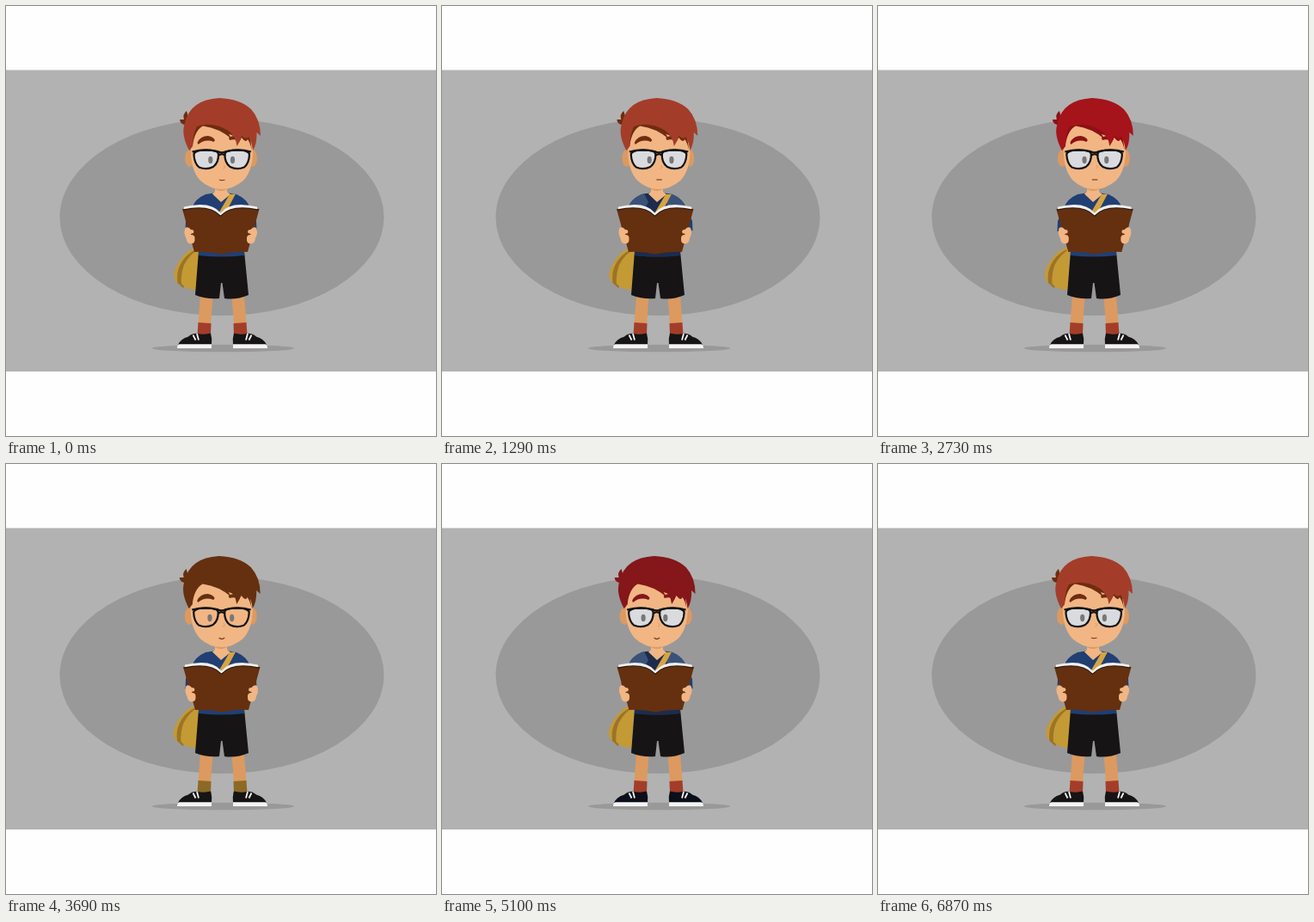
Animation, 500 px wide and 500 px high, one loop 6.9 s. Source, as an HTML page:

```html
<!DOCTYPE html>
<html lang="en">
<head>
<meta charset="utf-8">
<title>Boy reading</title>
<style>
html, body { margin: 0; width: 100%; height: 100%; overflow: hidden; background: #fefefe; }
svg { display: block; width: 100%; height: 100%; }
.skin { fill: #f1b684; }
.shade { fill: #dc9a60; }
.shirt { fill: #213f73; }
.dark { fill: #161414; }
.hair { fill: var(--hair); }
.under { fill: var(--under); }
.sock { fill: var(--sock); }
.shoe { fill: var(--shoe); }
.frame { fill: var(--lens); stroke: #121212; stroke-width: 2.2; }
</style>
</head>
<body>
<svg id="stage" viewBox="0 0 500 500">
  <defs>
    <g id="foot">
      <path class="shade" d="M226 336 L240.500 338 L238 370 H223.500 Z"/>
      <path class="sock" d="M223.500 368 L238.500 369 L238 383 H222.500 Z"/>
      <path class="shoe" d="M200 394 Q203 387 212 384.500 Q217 380 223 381 Q231 382.500 238 380.500 Q240 387 239 394 Z"/>
      <path d="M199 398 Q199 393.500 202 393.300 H239 V398 Z" fill="#f4f4f4"/>
      <path d="M217.500 382.500 L220.500 388.500 M222 381 L224 388.500" stroke="#f4f4f4" stroke-width="1.800"/>
    </g>
    <path id="hand" class="skin" d="M208.500 258 Q212 256 215 260 Q219.500 260 218 264 Q214 265 215 266 Q220 266 219.500 271 Q220 276 215 276.500 Q210 276 209.500 270 Q206 264 208.500 258 Z"/>
    <path id="lens" class="frame" d="M218.500 173 Q218 168 232 167.500 Q246 167.500 247 172 Q247.500 182 241 187 Q233 191 224.500 187.500 Q219 183 218.500 173 Z"/>
  </defs>

  <rect y="74.500" width="500" height="350.500" fill="#b2b2b2"/>
  <ellipse cx="251" cy="245.500" rx="188.500" ry="114.500" fill="#999"/>
  <ellipse cx="252.500" cy="398" rx="82.500" ry="4.300" fill="#999"/>

  <use href="#foot"/>
  <use href="#foot" transform="matrix(-1 0 0 1 503 0)"/>

  <g id="bag">
    <path d="M224 281 Q214 281 206 291 Q196 303 195 313 Q197 323 205 326 L222 322 Z" fill="#c49a35"/>
    <path d="M221 283 Q208 289 202 302 Q198 311 199.500 322 L206 328 L216 312 Z" fill="#9c7426"/>
    <path d="M225 282 Q214 288 207 301 Q203 312 204 323 Q211 331 222 329.500 Z" fill="#c49a35"/>
  </g>

  <path class="dark" d="M224 285 H277 L282 336 Q268 342 254 340 L251.500 322 H250 L248 340 Q234 341.500 220 336 Z"/>
  <path class="shirt" d="M232 219 Q251 215 268 219 Q280 224 284 235 L291 250 L291.500 261 L277 264 V290 Q251 293 224 290 V264 L208.500 262 L209 250 L216 235 Q220 224 232 219 Z"/>
  <g id="tint">
    <path d="M236 218 H265 L277 264 V290 Q251 293 224 290 V264 Z" fill="#1d2c4d"/>
    <path d="M232 219 Q220 224 216 235 L233 240 L240 228 L235 218 Z M268 219 Q280 224 284 235 L267 240 L260 228 L265 218 Z" fill="#3b5278"/>
  </g>
  <path class="skin" d="M243 208 H257 V216 L261 219 L250 228 L240 218.500 L243 216 Z"/>
  <path class="shade" d="M243 210 H257 V213 Q250 217 243 213 Z"/>
  <path d="M260 219 L267 218.500 L254 243 H246 Z" fill="#d5a443"/>

  <g id="head">
    <ellipse class="shade" cx="213.500" cy="177" rx="5.500" ry="10"/>
    <ellipse class="shade" cx="287" cy="177" rx="5" ry="10"/>
    <path class="skin" d="M215 165 Q214 133 250 133 Q287 133 287 165 Q288 190 276 203 Q264 213 251 213 Q237 213 226 203 Q214 190 215 165 Z"/>
    <path class="under" d="M222.500 159 Q226 151 235 151 Q241 152 243 156 L241.500 158 Q232 154 223.500 161 Z M259 153 Q266 149 273 153 L272 157 Q266 154 260 156 Z"/>
    <path class="under" d="M211 138 Q203 139 202 132 L207 132 Q205 126 210 122 L212 129 Z M220 140 Q250 128 282 140 L286 168 Q284 159 281 155 Q279 160 274 153 L271 158 Q267 151 259 149 L263 155 Q248 142 229 139.500 Q219 145 217 163 L213 168 Z"/>
    <path class="hair" d="M213 168 Q203 149 208 136 Q214 109 248 107 Q272 108 285 120 Q296 132 296 151 L291.500 147 Q292 160 287 168 Q286 158 282 152 Q279 156 274 151 Q272 158 268.500 163 Q267 150 257 144 Q239 134 222 140 Q217 149 217 163 Z"/>
    <use href="#lens"/>
    <use href="#lens" transform="matrix(-1 0 0 1 501.500 0)"/>
    <g id="pupils" fill="#777">
      <ellipse cx="237.800" cy="179" rx="2.600" ry="4.200"/>
      <ellipse cx="263.500" cy="179" rx="2.600" ry="4.200"/>
    </g>
    <path d="M216.500 169.500 Q232 165.500 246 169 Q251 172 256 169 Q270 165.500 285 169.500 M247 174 Q251 170 255 174" fill="none" stroke="#121212" stroke-width="2.300"/>
    <path d="M253 185 Q256 188 252.500 189" fill="none" stroke="#dc9a60" stroke-width="1"/>
    <path id="mouth" fill="none" stroke="#7b3f20" stroke-width="1.200"/>
  </g>

  <g id="book">
    <path d="M205 236 Q233 228 249.500 243 Q266 228 294.500 236 L281 286 Q265 285 250 288.500 Q235 285 219 286 Z" fill="#65300f"/>
    <path d="M206 237 Q237 230 249.500 244 Q262 230 293.500 237" fill="none" stroke="#24130b" stroke-width="1.300"/>
    <path d="M207 233.500 Q238 226 249.500 240.500 Q261 226 292 233.500 L292.500 236.300 Q262 230 249.500 243.500 Q237 230 206.500 236.300 Z" fill="#efefef"/>
    <use href="#hand"/>
    <use href="#hand" transform="matrix(-1 0 0 1 499.500 0)"/>
  </g>
</svg>
<script>
const LOOP = 6900;
const times = [0, 1290, 2730, 3690, 5100, 6000, LOOP];
const bookX = [0, -2, 2.3, 1, -1.5, -1.6, 0];
const bagX = [0, -1, -1.5, -0.5, -1.5, -1, 0];
const smile = [0.8, 0, 0, 2, 2, 2, 0.8];
const tint = [0, 1, 0, 0, 1, 1, 0];

const auburn = { hair: '#a33d29', under: '#702c0f', sock: '#a33d29', shoe: '#161414', lens: '#d9dbdf' };
const looks = [
  auburn,
  { ...auburn, hair: '#a5141a', under: '#8d1015' },
  { ...auburn, hair: '#65300f', under: '#65300f', sock: '#8b6a25', lens: 'none' },
  { ...auburn, hair: '#85161a', under: '#85161a', shoe: '#0b0f1a' },
  auburn
];

const el = id => document.getElementById(id);
const shift = (id, x) => el(id).setAttribute('transform', `translate(${x} 0)`);

// Eased value between the poses surrounding time t
function pose(values, t) {
  const i = times.findIndex(end => end > t) - 1;
  const p = (t - times[i]) / (times[i + 1] - times[i]);
  return values[i] + (values[i + 1] - values[i]) * (1 - Math.cos(Math.PI * p)) / 2;
}

function draw(now) {
  const t = now % LOOP;
  const sway = Math.sin(2 * Math.PI * t / LOOP);
  const look = looks[Math.floor(t / LOOP * looks.length)];
  for (const key in look) el('stage').style.setProperty('--' + key, look[key]);
  shift('head', 1.4 * sway);
  shift('pupils', 2.3 * sway);
  shift('book', pose(bookX, t));
  shift('bag', pose(bagX, t));
  el('tint').style.opacity = pose(tint, t);
  el('mouth').setAttribute('d', `M248 202 Q251 ${202 + 1.5 * pose(smile, t)} 254.500 202`);
  requestAnimationFrame(() => draw(performance.now() - start));
}

const start = performance.now();
draw(0);
</script>
</body>
</html>
```
